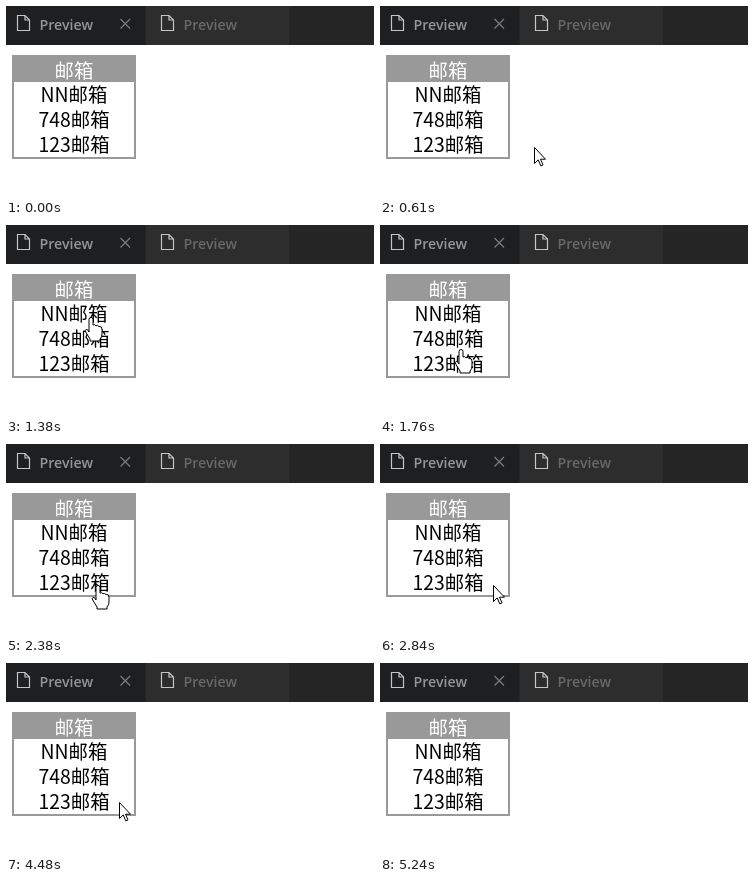
Animation, 368 px wide and 191 px high, one loop 5720 ms. Source, as an HTML page:

```html
<!DOCTYPE html>
<html lang="zh-CN">
<head>
<meta charset="utf-8">
<title>Preview</title>
<style>
  html, body { margin: 0; width: 100%; height: 100%; overflow: hidden; background: #fff; }
  svg { display: block; }
  .tab { font: 600 14.2px "Open Sans", "Noto Sans", sans-serif; }
  .menu { font: 300 19.4px "Noto Sans CJK SC", "Noto Sans CJK", sans-serif; text-anchor: middle; }
  .menu .head { font-weight: 500; fill: #fff; }
  #arrow, #hand { fill: #fff; stroke: #000; stroke-linejoin: round; }
</style>
</head>
<body>
<svg width="368" height="191" viewBox="0 0 368 191">
  <defs>
    <path id="file" d="M.5.5h7.500l4.500 4.500v10.500h-12zM8 .5V5h4.500" fill="none" stroke="#c5c5c5" stroke-width="1.2"/>
  </defs>
  <rect width="368" height="39" fill="#252526"/>
  <rect width="139" height="39" fill="#1e1f21"/>
  <rect x="140" width="143" height="39" fill="#2d2d2d"/>
  <use href="#file" x="11" y="9"/>
  <use href="#file" x="155" y="9"/>
  <g class="tab">
    <text x="33.500" y="24" fill="#959595">Preview</text>
    <text x="177.500" y="24" fill="#686868">Preview</text>
  </g>
  <path d="M114.500 13l9.500 9.500m0-9.500l-9.500 9.500" stroke="#7c7c7c" stroke-width="1.2"/>

  <rect x="7" y="50" width="122" height="102" fill="#fff" stroke="#999" stroke-width="2"/>
  <rect x="6" y="49" width="124" height="27" fill="#999"/>
  <g class="menu">
    <text x="68" y="71.500" class="head">邮箱</text>
    <text x="68" y="96">NN邮箱</text>
    <text x="68" y="121">748邮箱</text>
    <text x="68" y="146">123邮箱</text>
  </g>

  <g id="cursor">
    <path id="arrow" d="M.5.5v16l3.700-3.600 2.600 6 2.200-1-2.500-5.700h5z"/>
    <path id="hand" d="M-2 14V2.500a2 2 0 0 1 4 0V8q1.500-1 3 .7 1.500-.9 3 .8 3-.5 3 2.500v5q0 3-2 5v2H-1v-2l-4.300-7q-1-2 .5-2.700 1.300-.5 2.800 2.700z"/>
  </g>
</svg>
<script>
const LOOP = 5720, STEP = 1000 / 13, LINK_EDGE = 100;
const OFFSTAGE = [225, 207];

const easeOut = power => u => 1 - (1 - u) ** power;
const easeIn = u => u * u;
const linear = u => u;

// Each move starts where the one before came to rest.
const moves = [
  { start: 530, steps: 8, to: [87, 79], ease: easeOut(2.5) },
  { start: 1300, steps: 8, to: [80, 130], ease: linear },
  { start: 1920, steps: 4, to: [80, 141], ease: linear },
  { start: 2380, steps: 8, to: [113, 141], ease: easeOut(3.5) },
  { start: 3700, steps: 3, to: [90, 141], ease: easeOut(2) },
  { start: 4250, steps: 4, to: [113, 139], ease: easeOut(2) },
  { start: 5090, steps: 3, to: [282, 195], ease: easeIn }
];

const byId = id => document.getElementById(id);
const cursor = byId("cursor"), arrow = byId("arrow"), hand = byId("hand");
const show = (node, on) => node.setAttribute("visibility", on ? "visible" : "hidden");

function pointerAt(t) {
  let point = OFFSTAGE;
  for (const { start, steps, to, ease } of moves) {
    if (t < start) break;
    const step = Math.floor((t - start) / STEP + 0.1) + 1;
    const k = ease(Math.min(step / steps, 1));
    point = point.map((from, i) => Math.round(from + (to[i] - from) * k));
  }
  return point;
}

function draw() {
  const point = pointerAt(performance.now() % LOOP);
  const overLink = point[0] < LINK_EDGE;
  cursor.setAttribute("transform", `translate(${point})`);
  show(hand, overLink);
  show(arrow, !overLink);
  requestAnimationFrame(draw);
}
draw();
</script>
</body>
</html>
```
